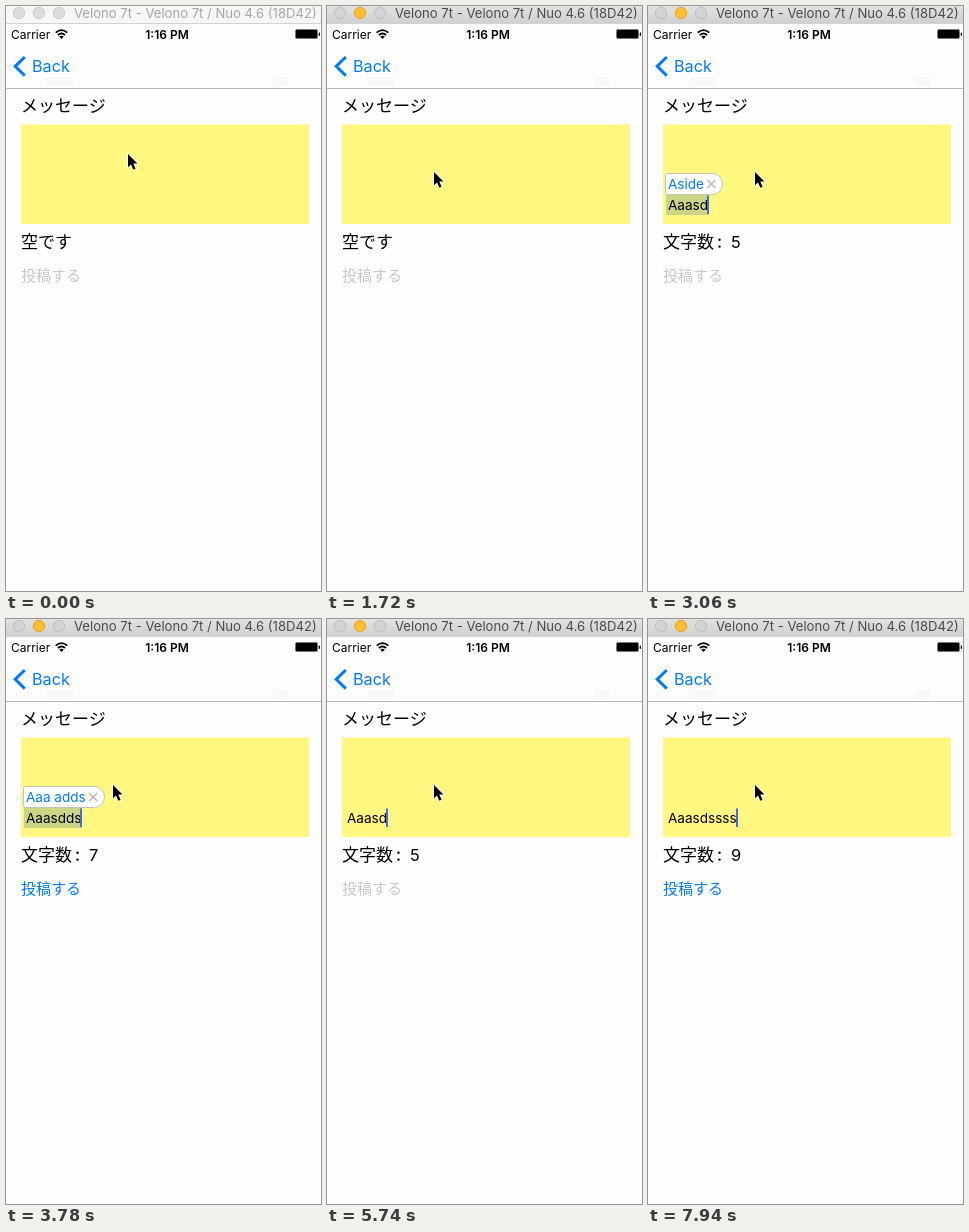
These frames come from a looping animation (315x585 px, 8 s). An HTML page:

```html
<!DOCTYPE html>
<html lang="ja">
<head>
<meta charset="utf-8">
<title>Message form</title>
<style>
  html, body { margin: 0; width: 100%; height: 100%; overflow: hidden; background: #fff; }
  svg { display: block; width: 315px; height: 585px; }
  text { font-family: Inter, "Noto Sans CJK JP", "Noto Sans CJK", sans-serif; white-space: pre; }
  .jp { font-family: "Noto Sans CJK JP", "Noto Sans CJK", sans-serif; font-size: 17px; }
  .entry { font-size: 13.55px; }
  .blue { fill: #007aff; }
  #bar { fill: #f6f6f6; }
  #lights circle { fill: #dcdcdc; stroke: #cbcbcb; }
  #title { font-size: 13.1px; fill: #a6a6a6; }
  .active #bar { fill: url(#chrome); }
  .active #lights circle { fill: #d3d3d3; stroke: #bfbfbf; }
  .active #lights .mid { fill: #fdbe32; stroke: #e5a52c; }
  .active #title { fill: #4b4b4b; }
  #post { font-size: 15px; fill: #c8c8c8; }
  #post.on { fill: #007aff; }
</style>
</head>
<body>
<svg id="stage" viewBox="0 0 315 585">
  <defs>
    <linearGradient id="chrome" x2="0" y2="1">
      <stop stop-color="#e2e2e2"/>
      <stop offset="1" stop-color="#d0d0d0"/>
    </linearGradient>
  </defs>
  <rect width="315" height="585" fill="#fefefe"/>

  <rect id="bar" width="315" height="17"/>
  <path d="M0 17.5H315" stroke="#d2d2d2"/>
  <g id="lights">
    <circle cx="13" cy="7" r="5.7"/>
    <circle class="mid" cx="33" cy="7" r="5.7"/>
    <circle cx="53" cy="7" r="5.7"/>
  </g>
  <text id="title" x="68" y="12">Velono 7t - Velono 7t / Nuo 4.6 (18D42)</text>

  <rect y="18" width="315" height="64" fill="#fdfdfd"/>
  <path d="M41 71h26v9H41zM267 71h15v9h-15z" fill="#f8f8f8"/>
  <path d="M0 82.5H315" stroke="#b9b9b9"/>
  <text x="5" y="33" font-size="12">Carrier</text>
  <g fill="none" stroke="#000" stroke-width="1.7">
    <path d="M49.7 26.6q5.8-5 11.6 0M51.9 29q3.6-3 7.2 0"/>
    <path d="M53.2 30.6q2.3-1.6 4.6 0l-2.3 2.4z" fill="#000" stroke="none"/>
  </g>
  <text x="161" y="33" font-size="12" font-weight="600" text-anchor="middle">1:16 PM</text>
  <rect x="289.5" y="23.5" width="22" height="9" rx="1.5" stroke="#777"/>
  <rect x="312.7" y="26.5" width="1.3" height="3.4" rx=".6"/>
  <path d="M18.8 51L9.2 60.3L18.8 69.6" fill="none" stroke="#007aff" stroke-width="3"/>
  <text class="blue" x="26" y="66" font-size="16.2">Back</text>

  <text class="jp" x="15" y="106">メッセージ</text>
  <rect x="15" y="118.5" width="288" height="99.5" fill="#fff780"/>
  <rect id="mark" x="18" y="189" height="20" fill="#cbd585"/>
  <text id="entry" class="entry" x="20" y="204"></text>
  <rect id="caret" y="189.5" width="2" height="18.5" fill="#426bf2"/>
  <g id="bubble">
    <path id="shell" fill="#fff" stroke="#c4c4b4"/>
    <text id="hint" class="entry blue" x="20" y="183"></text>
    <path id="close" d="M-4-4L4 4M4-4L-4 4" stroke="#b0b0b0" stroke-width="1.1"/>
  </g>

  <text id="empty" class="jp" x="15" y="242">空です</text>
  <g id="tally">
    <text class="jp" x="15" y="242">文字数</text>
    <circle cx="71.5" cy="233.8" r="1.2"/>
    <circle cx="71.5" cy="240.6" r="1.2"/>
    <text id="count" x="83" y="242" font-size="16.4"></text>
  </g>
  <text id="post" class="jp" x="15" y="275" style="font-size:15px">投稿する</text>

  <path id="pointer" d="M0 0v13.2l3-2.8 2.3 5.3 2.3-1-2.3-5.1h4.2z"
        stroke="#fff" stroke-width="1.8" paint-order="stroke" stroke-linejoin="round"/>
</svg>
<script>
const LOOP = 8000;
const MAX_SHORT = 5;

// Each track is a list of [start in ms, value].
const lengths = [
  [0, 0], [1830, 1], [2120, 2], [2410, 3], [2650, 4], [3060, 5], [3420, 6],
  [3780, 7], [3960, 8], [4200, 9], [4320, 10], [4490, 11],
  [4970, 10], [5140, 9], [5260, 8], [5440, 7], [5620, 6], [5740, 5],
  [6440, 6], [6980, 7], [7400, 8], [7940, 9]
];
const words = [[0, 'Aaasddsfdsf'], [5740, 'Aaasdssss']];
const hints = [[0, ''], [2360, 'As'], [2710, 'Was'], [3060, 'Aside'], [3780, 'Aaa adds'], [3960, '']];
const pointerPath = [[0, [122, 148]], [530, [118, 153]], [590, [110, 162]], [650, [107, 166]]];
const blinks = [[1540, 1830], [6330, 6440]];

const el = Object.fromEntries([...document.querySelectorAll('[id]')].map(e => [e.id, e]));
const at = (track, t) => track.findLast(([start]) => start <= t)[1];
const show = (e, on) => e.setAttribute('visibility', on ? 'visible' : 'hidden');
const place = (e, x, y) => e.setAttribute('transform', `translate(${x} ${y})`);

function write(e, text) {
  if (e.textContent !== text) e.textContent = text;
  return text ? e.getComputedTextLength() : 0;
}

function caretOpacity(t) {
  if (t < 1000) return 0;
  const blink = blinks.find(([from, to]) => t >= from && t < to);
  return blink ? Math.max(0, 1 - (t - blink[0] + 50) / 200) : 1;
}

function drawBubble(hint) {
  show(el.bubble, hint);
  const end = 20 + write(el.hint, hint);
  const right = Math.round(end + 19) - 0.5;
  el.shell.setAttribute('d', `M19.5 167.5H${right - 10}a10 10.5 0 0 1 0 21H19.5q-2 0-2-2v-17q0-2 2-2z`);
  place(el.close, end + 7.4, 178);
}

function draw(t) {
  el.stage.classList.toggle('active', t >= 880);
  place(el.pointer, ...at(pointerPath, t));

  const n = at(lengths, t);
  const end = 20 + write(el.entry, at(words, t).slice(0, n));
  const caretX = Math.floor(end - 0.5);
  el.caret.setAttribute('x', caretX);
  el.caret.setAttribute('opacity', caretOpacity(t));
  show(el.mark, n && t < 3960);
  el.mark.setAttribute('width', caretX - 16);
  drawBubble(at(hints, t));

  show(el.empty, !n);
  show(el.tally, n);
  write(el.count, String(n));
  el.post.classList.toggle('on', n > MAX_SHORT);
}

const begin = performance.now();
function tick() {
  draw((performance.now() - begin) % LOOP);
  requestAnimationFrame(tick);
}
tick();
</script>
</body>
</html>
```
